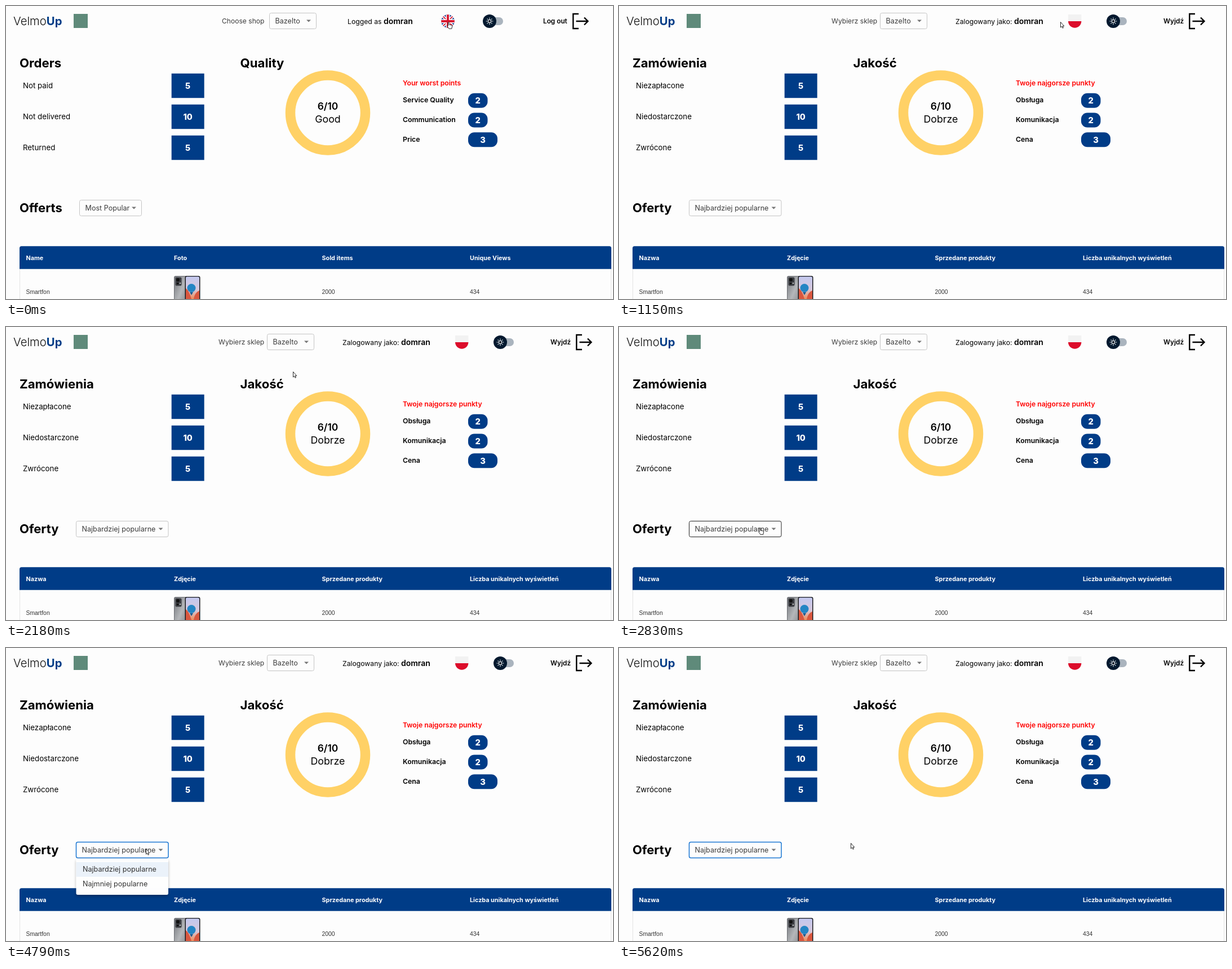
An HTML page that plays this animation: 1077x520 px, repeating every 5640 ms.

```html
<!DOCTYPE html>
<html lang="pl">
<head>
<meta charset="utf-8">
<title>Sales dashboard</title>
<style>
  html, body { margin: 0; width: 100%; height: 100%; overflow: hidden; background: #fdfdfd; }
  svg { display: block; font-family: Inter, sans-serif; }
  .plain { font-family: "Liberation Sans", Arial, sans-serif; }
</style>
</head>
<body>
<svg id="stage" width="1077" height="520" viewBox="0 0 1077 520"></svg>
<script>
const LOOP = 5640;
const BLUE = '#003c87', INK = '#000', GREY = '#3c3c3c';

const text = (str, x, y, size, { weight = 400, fill = INK, anchor = 'start', cls = '' } = {}) =>
  `<text x="${x}" y="${y}" font-size="${size}" font-weight="${weight}" fill="${fill}" text-anchor="${anchor}" class="${cls}">${str}</text>`;
const rect = (x, y, w, h, fill, extra = '') =>
  `<rect x="${x}" y="${y}" width="${w}" height="${h}" fill="${fill}" ${extra}/>`;
const white = { weight: 700, fill: '#fff' };
const badge = { weight: 800, fill: '#fff', anchor: 'middle' };

const select = (x, y, w, label, id = '') =>
  rect(x + .5, y + .5, w - 1, 28, '#fdfdfd', `rx="3" stroke="#c4c4c4" id="${id}"`) +
  text(label, x + 10.5, y + 18.5, 12.6, { fill: GREY }) +
  `<path class="${id}" d="M${x + w - 18} ${y + 12.5}h8l-4 4z" fill="#757575"/>`;

const flags = {
  en: `<g clip-path="url(#disc)"><path d="M-12-12h24v24h-24z" fill="#1b3a8c"/>
    <path d="M-12-12L12 12M12-12L-12 12" stroke="#fff" stroke-width="5"/>
    <path d="M-12-12L12 12M12-12L-12 12" stroke="#d8142e" stroke-width="1.7"/>
    <path d="M-12 0h24M0-12v24" stroke="#fff" stroke-width="7"/>
    <path d="M-12 0h24M0-12v24" stroke="#d8142e" stroke-width="3.8"/></g>`,
  pl: `<path d="M-11.7-12h23.4v12h-23.4z" fill="#f2f2f2"/>
    <path d="M-11.7 0h23.4a11.7 11.7 0 0 1-23.4 0z" fill="#dc0d2b"/>`
};

const rays = Array.from({ length: 8 }, (_, i) =>
  `<path d="M0-4.6v-1.6" transform="rotate(${i * 45})"/>`).join('');
const themeSwitch = x => `<g transform="translate(${x} 27)">
  ${rect(-10, -7, 34, 14, '#aab4be', 'rx="7"')}<circle r="12" fill="#03192f"/>
  <g fill="none" stroke="#fff" stroke-width="1.2"><circle r="2.8"/>${rays}</g></g>`;

const exitIcon = x => `<path transform="translate(${x} 0)" d="M11 14H1.3V40H11M6.5 27H27.5M21 20.5L27.5 27L21 33.5"
  fill="none" stroke="#000" stroke-width="2.4"/>`;

const languages = {
  en: {
    shop: ['Choose shop', 383, 467], user: ['Logged as', 606, 670],
    theme: 858, exit: ['Log out', 953, 1005],
    orders: ['Orders', 'Not paid', 'Not delivered', 'Returned'],
    quality: ['Quality', 'Good', 'Your worst points', 'Service Quality', 'Communication', 'Price'],
    offers: 'Offerts', sort: ['Most Popular', 130, 111],
    columns: ['Name', 'Foto', 'Sold items', 'Unique Views']
  },
  pl: {
    shop: ['Wybierz sklep', 377, 463], user: ['Zalogowany jako:', 597, 701],
    theme: 877, exit: ['Wyjdź', 966, 1011],
    orders: ['Zamówienia', 'Niezapłacone', 'Niedostarczone', 'Zwrócone'],
    quality: ['Jakość', 'Dobrze', 'Twoje najgorsze punkty', 'Obsługa', 'Komunikacja', 'Cena'],
    offers: 'Oferty', sort: ['Najbardziej popularne', 124, 164.5],
    columns: ['Nazwa', 'Zdjęcie', 'Sprzedane produkty', 'Liczba unikalnych wyświetleń']
  }
};

function labels(lang) {
  const l = languages[lang], heading = { weight: 700 }, strong = { weight: 600 };
  return `<g id="${lang}">` +
    text(l.shop[0], l.shop[1], 31, 12.1, { fill: GREY }) + select(l.shop[2], 12, 84, 'Bazelto') +
    text(l.user[0], l.user[1], 32, 12.2) + text('domran', l.user[2], 32, 14, strong) +
    themeSwitch(l.theme) + text(l.exit[0], l.exit[1], 31, 11.8, strong) + exitIcon(l.exit[2]) +
    text(l.orders[0], 24, 109, 22.2, heading) +
    l.orders.slice(1).map((s, i) => text(s, 30, 146 + 55 * i, 13.3)).join('') +
    text(l.quality[0], 415.5, 109, 22.2, heading) +
    text(l.quality[1], 571, 207, 17.8, { anchor: 'middle' }) +
    text(l.quality[2], 704, 141, 12.2, { weight: 600, fill: '#f00' }) +
    l.quality.slice(3).map((s, i) => text(s, 704, 171.3 + 34.8 * i, 12.3, strong)).join('') +
    text(l.offers, 24, 366, 22, heading) +
    select(l.sort[1], 344, l.sort[2], l.sort[0], 'sort-' + lang) +
    l.columns.map((s, i) => text(s, 35.5 + 262.5 * i, 450.5, 10.8, white)).join('') + '</g>';
}

const phone = `<g transform="translate(298 479)">
  ${rect(0, 0, 24, 50, '#6f7176', 'rx="3"')}${rect(1, 1, 21, 50, 'url(#metal)', 'rx="2"')}
  ${rect(2.5, 2.5, 11, 15, '#3b3d42', 'rx="2"')}
  <circle cx="7" cy="7" r="3" fill="#111"/><circle cx="6.5" cy="13.5" r="1.8" fill="#111"/>
  <circle cx="11" cy="13" r="1.3" fill="#bbb"/>
  ${rect(19.5, 0, 27, 50, '#17181c', 'rx="3"')}${rect(21, 1.3, 24, 50, 'url(#screen)', 'rx="2"')}
  <path d="M21 22q6 4 10 19H21zM45 26q-8 3-10 15h10z" fill="#d9573f"/>
  <circle cx="31" cy="21.5" r="7.5" fill="#2485c4"/>
  <path d="M28 29h6l-3 5z" fill="#215a8d"/></g>`;

const scene = `
  <defs>
    <clipPath id="disc"><circle r="11.8"/></clipPath>
    <linearGradient id="metal" x2="1" y2="1"><stop stop-color="#74777c"/><stop offset=".55" stop-color="#b5b7ba"/><stop offset="1" stop-color="#85878b"/></linearGradient>
    <linearGradient id="screen" x2="0" y2="1"><stop stop-color="#c3c8ef"/><stop offset=".45" stop-color="#d7c8dc"/><stop offset=".8" stop-color="#ef8b55"/></linearGradient>
    <filter id="shadow" x="-10%" y="-20%" width="120%" height="150%"><feDropShadow dx="0" dy="2.5" stdDeviation="2.5" flood-opacity=".3"/></filter>
  </defs>
  ${rect(0, 0, 1077, 520, '#fdfdfd')}
  <text x="13" y="34" font-size="20.3" font-weight="300" fill="#111">Velmo<tspan font-weight="700" fill="${BLUE}">Up</tspan></text>
  ${rect(120, 14, 25, 25, '#5f8a7a')}
  ${['5', '10', '5'].map((n, i) => rect(293.7, 119.8 + 55 * i, 58, 43.4, BLUE) +
    text(n, 322.7, 146.5 + 55 * i, 14.5, badge)).join('')}
  <circle cx="571" cy="189.5" r="66.5" fill="none" stroke="#ffd166" stroke-width="17.5"/>
  ${text('6/10', 571, 183.5, 17.4, { weight: 600, anchor: 'middle' })}
  ${[[2, 34.5], [2, 34.5], [3, 52]].map(([n, w], i) => rect(820, 154.7 + 34.8 * i, w, 26, BLUE, 'rx="11"') +
    text(n, 820 + w / 2, 173 + 34.8 * i, 14.7, badge)).join('')}
  <path d="M24.5 460V520M1073.5 460V520" stroke="#e3e3e3"/>
  <path d="M24 466.7V429.7q0-3.5 3.5-3.5H1070.5q3.5 0 3.5 3.5V466.7z" fill="${BLUE}"/>
  ${[['Smartfon', 35.5], ['2000', 560.5], ['434', 823]].map(([s, x]) =>
    text(s, x, 511, 10.4, { fill: '#333', cls: 'plain' })).join('')}
  ${phone}${labels('en')}${labels('pl')}
  <g id="flag-en">${flags.en}</g><g id="flag-pl" transform="translate(808.7 27)">${flags.pl}</g>
  <g id="menu">
    ${rect(124.5, 374, 163.5, 64, '#fff', 'rx="3" filter="url(#shadow)"')}
    ${rect(124.5, 380, 163.5, 26, '#ebf2fa')}
    ${text('Najbardziej popularne', 136, 397, 12.6, { fill: '#333' })}
    ${text('Najmniej popularne', 136, 423, 12.6, { fill: '#333' })}
  </g>
  <g id="cursor" fill="#fff" stroke="#111" stroke-width=".9" stroke-linejoin="round">
    <path id="arrow" d="M.5.5V10L2.6 8.1L4.1 11.3L5.5 10.6L4.1 7.6H6.8z"/>
    <path id="hand" d="M1.3 1.2Q2.2 0 3.1 1.2V5L7.6 6Q8.9 6.4 8.7 7.8L7.8 12.3H3L.1 8.3Q-.5 7 1.3 7.3z"/>
  </g>`;

const $ = id => document.getElementById(id);
$('stage').innerHTML = scene;
const sortBorder = $('sort-pl'), sortArrow = document.querySelector('.sort-pl');

// Pointer path: time, x, y
const path = [
  [0, 783, 28], [1150, 783, 28], [1300, 770, 50], [1420, 720, 62], [1550, 630, 69],
  [1700, 554, 72], [1900, 530, 74], [2180, 509, 79], [2270, 498, 83], [2400, 460, 115],
  [2500, 388, 205], [2600, 345, 260], [2700, 283, 303], [2780, 255, 345], [2830, 248, 356],
  [4790, 248, 356], [5000, 275, 353], [5340, 348, 345], [5450, 375, 343], [5620, 411, 346], [LOOP, 411, 346]
];
const clamp = v => Math.max(0, Math.min(1, v));
const easeOut = v => 1 - (1 - clamp(v)) ** 2;
const show = (id, on) => $(id).setAttribute('visibility', on ? 'visible' : 'hidden');

function pointerAt(t) {
  const i = path.findIndex(p => p[0] > t);
  const [t0, x0, y0] = path[i - 1], [t1, x1, y1] = path[i];
  const k = (t - t0) / (t1 - t0);
  return [Math.round(x0 + (x1 - x0) * k), Math.round(y0 + (y1 - y0) * k)];
}

function drawMenu(t) {
  const closing = t >= 4790;
  const opacity = closing ? 1 - easeOut((t - 4790) / 210) : easeOut((t - 2900) / 220);
  const size = closing ? 1 - easeOut((t - 4860) / 150) : easeOut((t - 2900) / 150);
  const sx = .75 + .25 * size, sy = .5625 + .4375 * size;
  $('menu').setAttribute('opacity', opacity);
  $('menu').setAttribute('transform', `translate(206 374) scale(${sx} ${sy}) translate(-206 -374)`);
}

function draw(t) {
  const polish = t >= 370, polishFlag = t >= 650;
  show('en', !polish);
  show('pl', polish);
  show('flag-en', !polishFlag);
  show('flag-pl', polishFlag);
  $('flag-en').setAttribute('transform', `translate(${polish ? 808.7 : 784} 27)`);

  const [x, y] = pointerAt(t);
  const focused = t >= 2920, hovered = t > 2700 && !focused && y >= 345;
  $('cursor').setAttribute('transform', `translate(${x} ${y})`);
  show('hand', !polish || hovered);
  show('arrow', polish && !hovered);

  sortBorder.setAttribute('stroke', focused ? '#1976d2' : hovered ? '#212121' : '#c4c4c4');
  sortBorder.setAttribute('stroke-width', focused ? 1.5 : 1);
  const open = focused && t < 4790;
  sortArrow.setAttribute('transform', open ? 'rotate(180 274.5 358.7)' : '');
  drawMenu(t);
}

function tick() {
  draw(performance.now() % LOOP);
  requestAnimationFrame(tick);
}
tick();
</script>
</body>
</html>
```
